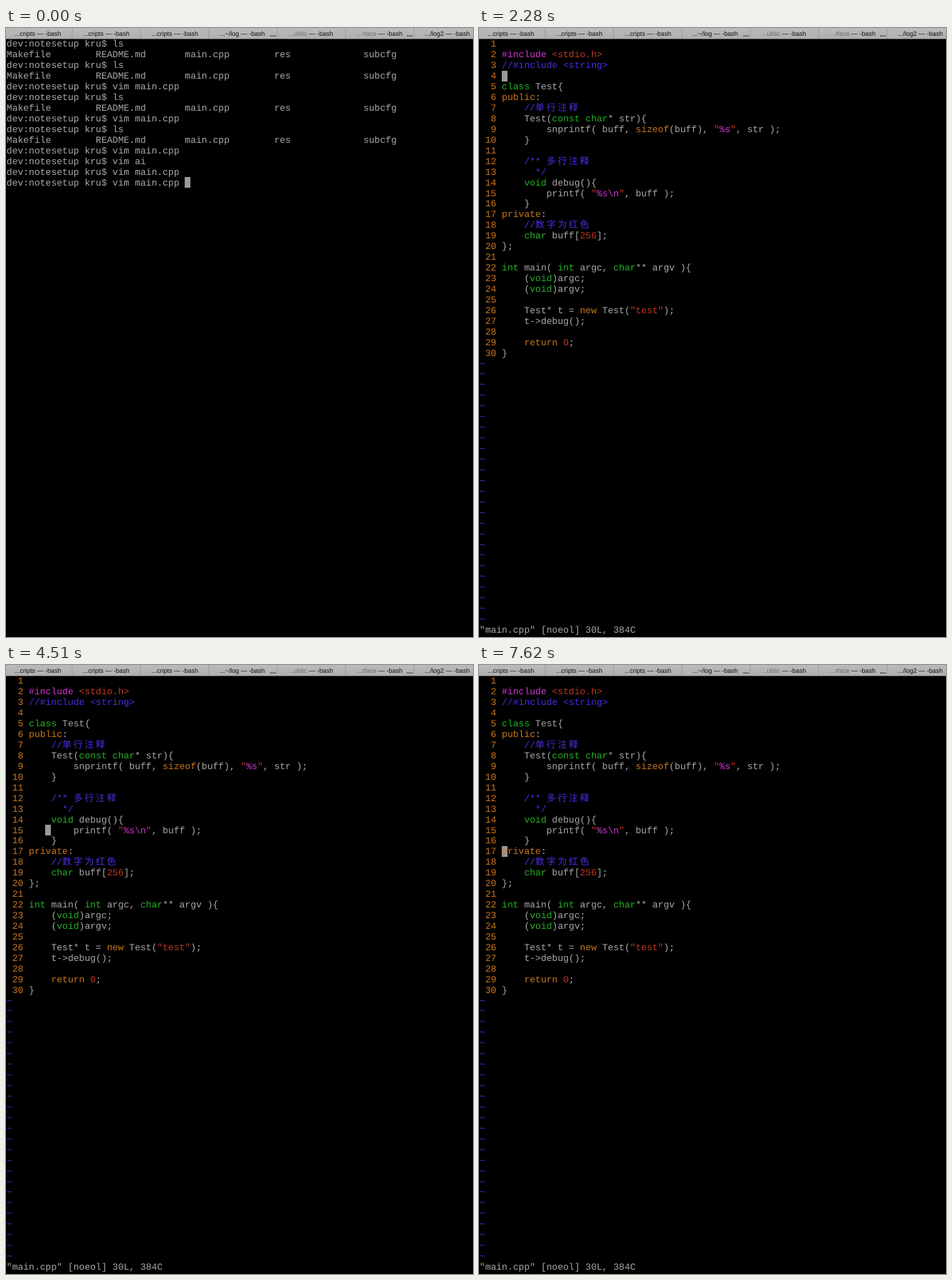
An HTML page with a canvas for the animation above (8 s loop, 656 by 854 pixels).

```html
<!DOCTYPE html>
<html lang="en">
<head>
<meta charset="utf-8">
<title>Terminal</title>
<style>
  html, body { margin: 0; width: 100%; height: 100%; overflow: hidden; background: #000; }
  canvas { display: block; }
</style>
</head>
<body>
<canvas id="stage" width="656" height="854"></canvas>
<script>
const ctx = document.getElementById('stage').getContext('2d');
ctx.textRendering = 'geometricPrecision';

const LOOP = 8000, COL = 7.83, ROW = 14.94, LEFT = 0.8, TOP = 15.25;
const MONO = '13.05px "Liberation Mono", monospace';
const CJK = '500 13px "Noto Sans CJK SC", "Noto Sans CJK", sans-serif';
const GREY = '#a9a9a9', CURSOR = '#999', MATCH = '#33bbc8';
const BLUE = '#492ee1', MAGENTA = '#d338d3', RED = '#c23621', GREEN = '#25b424', ORANGE = '#cb761c';

const prompt = 'dev:notesetup kru$ ';
const files = ['Makefile', 'README.md', 'main.cpp', 'res', 'subcfg'].map(s => s.padEnd(16)).join('');
const shell = ['ls', files, 'ls', files, 'vim main.cpp', 'ls', files, 'vim main.cpp', 'ls', files,
  'vim main.cpp', 'vim ai', 'vim main.cpp', 'vim main.cpp '].map(s => s === files ? s : prompt + s);

const code = String.raw`
#include <stdio.h>
//#include <string>

class Test{
public:
    //单行注释
    Test(const char* str){
        snprintf( buff, sizeof(buff), "%s", str );
    }

    /** 多行注释
      */
    void debug(){
        printf( "%s\n", buff );
    }
private:
    //数字为红色
    char buff[256];
};

int main( int argc, char** argv ){
    (void)argc;
    (void)argv;

    Test* t = new Test("test");
    t->debug();

    return 0;
}`.split('\n');

// One capture group per colour, in the order of tokenColors.
const tokens = /(\/\/.*|\/\*\*.*|\*\/)|(%s(?:\\n)?|#include)|("|<.*?>|\d+|test(?="))|\b(class|const|char|void|int)\b|\b(public|private|sizeof|new|return)\b/g;
const tokenColors = [BLUE, MAGENTA, RED, GREEN, ORANGE];

// The cursor walks down to line 22, then back up.
const moves = [450, 1830, 1980, 2280, 2430, 2730, 2880, 3020, 3320, 3610, 3760, 3910, 4060, 4360,
  4510, 4650, 4950, 5100, 5240, 5540, 5690, 5830, 6730, 6880, 7180, 7330, 7620];
const TURN = 21;

const tabs = [
  [12, '...cripts'], [108, '...cripts'], [204.5, '...cripts'], [300, '...~/log', 371],
  [397, '...ublic', 0, true], [493, '...rface', 563, true], [588, '.../log2']
];
const barFill = ctx.createLinearGradient(0, 0, 0, 15);
barFill.addColorStop(0, '#bababa');
barFill.addColorStop(1, '#b0b0b0');

function rect(color, x, y, w, h) {
  ctx.fillStyle = color;
  ctx.fillRect(x, y, w, h);
}

function cell(row, col, color) {
  const x = Math.floor(LEFT + col * COL);
  const y = Math.max(16, Math.floor(TOP + row * ROW));
  rect(color, x, y, 8, Math.round(TOP + (row + 1) * ROW) - y);
}

// Prints on the character grid and returns the next free column.
function print(row, col, text, color = GREY) {
  ctx.fillStyle = color;
  const y = Math.round(TOP + row * ROW + 11.1);
  for (const ch of text) {
    const wide = ch > '\u2e80';
    ctx.font = wide ? CJK : MONO;
    if (ch !== ' ') ctx.fillText(ch, LEFT + col * COL, y);
    col += wide ? 2 : 1;
  }
  return col;
}

function printCode(row, line) {
  let col = print(row, 0, String(row + 1).padStart(3) + ' ', ORANGE), end = 0;
  for (const m of line.matchAll(tokens)) {
    col = print(row, col, line.slice(end, m.index));
    col = print(row, col, m[0], tokenColors[m.slice(1).findIndex(Boolean)]);
    end = m.index + m[0].length;
  }
  print(row, col, line.slice(end));
}

function drawTabs() {
  rect(barFill, 0, 0, 656, 15);
  rect('#8c8c8c', 0, 15, 656, 0.5);
  for (let x = 93; x < 656; x += 96) rect('#999', x - 0.5, 0, 1, 15);
  for (const [x, name, more, dim] of tabs) {
    ctx.font = '9px "Liberation Sans", sans-serif';
    ctx.fillStyle = dim ? '#6c6c6c' : '#111';
    ctx.fillText(name, x, 11);
    ctx.fillStyle = '#111';
    ctx.fillText(' — -bash', x + ctx.measureText(name).width, 11);
    if (more) {
      ctx.font = 'bold 10px "Liberation Sans", sans-serif';
      ctx.fillText('...', more, 12);
    }
  }
}

function drawShell() {
  cell(shell.length - 1, 32, CURSOR);
  shell.forEach((line, row) => print(row, 0, line));
}

function drawEditor(row) {
  if (code[row] === '};') cell(4, 14, MATCH);
  cell(row, code[row].startsWith('    ') ? 7 : 4, CURSOR);
  code.forEach((line, i) => printCode(i, line));
  for (let i = code.length; i < 55; i++) print(i, 0, '~', BLUE);
  print(55, 0, '"main.cpp" [noeol] 30L, 384C');
}

const start = performance.now();
let shown;

function frame() {
  const t = (performance.now() - start) % LOOP;
  const step = moves.filter(m => m <= t).length - 1;
  if (step !== shown) {
    shown = step;
    rect('#000', 0, 0, 656, 854);
    drawTabs();
    if (step < 0) drawShell();
    else drawEditor(TURN - Math.abs(TURN - step));
  }
  requestAnimationFrame(frame);
}
frame();
</script>
</body>
</html>
```
